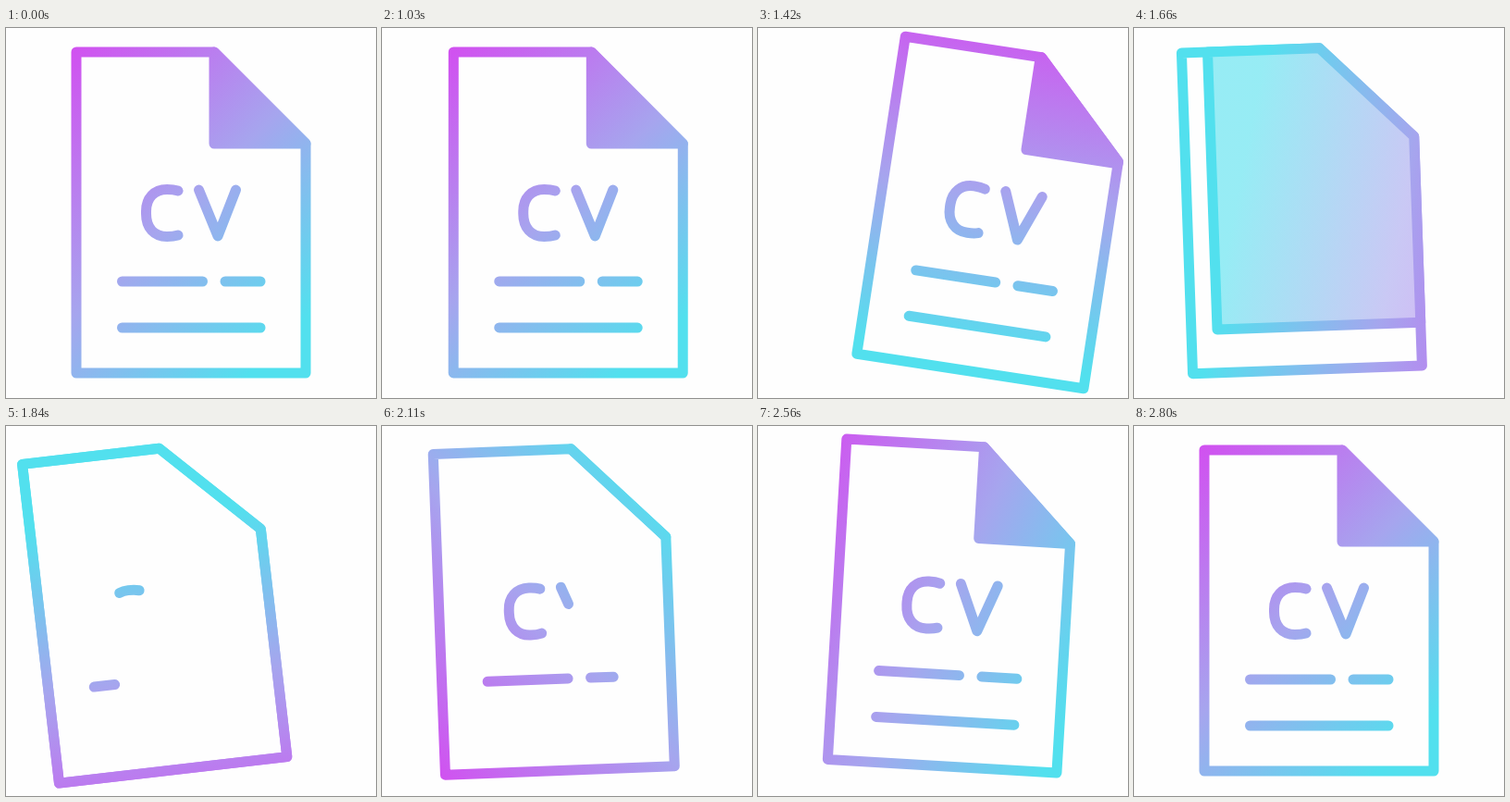
Write an HTML page that moves like this. It is 400 px wide and 400 px high and loops after 2830 ms.

```html
<!DOCTYPE html>
<html lang="en">
<head>
<meta charset="utf-8">
<title>CV</title>
<style>
  html, body { margin: 0; width: 100%; height: 100%; overflow: hidden; background: #fefefe; }
  svg { display: block; width: 100vw; height: 100vh; }
</style>
</head>
<body>
<svg viewBox="0 0 400 400">
  <defs>
    <linearGradient id="ink" gradientUnits="userSpaceOnUse">
      <stop offset="0" stop-color="#d052f0"/>
      <stop offset=".53" stop-color="#a6a5ee"/>
      <stop offset="1" stop-color="#52e0ee"/>
    </linearGradient>
  </defs>
  <g id="doc" fill="none" stroke="url(#ink)" stroke-width="11" stroke-linecap="round" stroke-linejoin="round">
    <path d="M76 26H225L324 125V373H76Z"/>
    <g id="content">
      <path data-from="1750" data-to="2050" pathLength="1" d="M186 176Q181 174.5 174 174.5C160 174.5 151.5 184 151.5 198V201C151.5 216 160 225.5 174 225.5Q181 225.5 186 224"/>
      <path data-from="2000" data-to="2400" pathLength="1" d="M208.5 175L229 225L248.5 175"/>
      <path data-from="1750" data-to="2020" pathLength="1" d="M125.5 274H212.5"/>
      <path data-from="2020" data-to="2170" pathLength="1" d="M237 274H275"/>
      <path data-from="2170" data-to="2440" pathLength="1" d="M125.5 324H275"/>
    </g>
    <path id="backing" stroke="none"/>
    <path id="fold" fill="url(#ink)"/>
  </g>
</svg>
<script>
const LOOP = 2830, START = 1030, STEP = 30;
const CLEARED = 1750, GROW = 2100;

const $ = id => document.getElementById(id);
const [doc, ink, fold, backing] = ['doc', 'ink', 'fold', 'backing'].map($);
const strokes = [...$('content').children];

const progress = (t, from, to) => Math.min(1, Math.max(0, (t - from) / (to - from)));
const ease = (t, from, to) => {
  const u = progress(t, from, to);
  return u * u * (3 - 2 * u);
};
const bump = (t, from, to) => Math.sin(Math.PI * progress(t, from, to)) ** 2;
const mix = (p, q, u) => p.map((v, i) => v + (q[i] - v) * u);

// Swing from rest to the right, left, right again and back to rest
const swing = (t, right, left, back) =>
  right * ease(t, 995, 1390)
  + (left - right) * ease(t, 1390, 1775)
  + (back - left) * ease(t, 1870, 2385)
  - back * ease(t, 2385, 2770);

// The colours make one full turn, fastest while the page turns
const inkAngle = t => 45
  + 45 * progress(t, 1000, 1420)
  + 180 * progress(t, 1420, 1840)
  + 90 * progress(t, 1840, 2320)
  + 45 * progress(t, 2320, 2800);

function setInk(t) {
  const angle = inkAngle(t) * Math.PI / 180;
  const offset = -22 - 100 * bump(t, 1350, 2050);
  [-190, 190].forEach((half, i) => {
    ink.setAttribute('x' + (i + 1), 200 + Math.cos(angle) * (offset + half));
    ink.setAttribute('y' + (i + 1), 199.5 + Math.sin(angle) * (offset + half));
  });
}

function foldPath(t) {
  const rest = [225, 125];
  const growing = t >= GROW;
  const grown = growing ? ease(t, GROW, 2400) : 1;
  const corner = growing
    ? mix([274.5, 75.5], rest, grown)
    : mix(rest, [76, 373], ease(t, 1400, 1760));
  const top = [Math.min(corner[0], 225), 26];
  const side = [324, Math.max(corner[1], 125)];
  return `M${top}L225 26L324 125L${side}L${mix(side, corner, grown)}Q${corner} ${mix(top, corner, grown)}Z`;
}

function render(t) {
  const x = swing(t, 57.3, -39.3, 16.5);
  const y = -3.6 * bump(t, 1440, 1830) - 7 * bump(t, 2050, 2800);
  const tilt = swing(t - 25, 8.7, -6.6, 5.1);
  doc.setAttribute('transform', `translate(${x} ${y}) rotate(${tilt} 200 199.5)`);
  setInk(t);

  const d = foldPath(t);
  fold.setAttribute('d', d);
  backing.setAttribute('d', d);
  backing.setAttribute('fill', t < CLEARED ? '#fefefe' : 'none');
  fold.setAttribute('fill-opacity', t < GROW ? 1 - progress(t, 1440, 1830) ** 1.6 : 1);

  for (const el of strokes) {
    const shown = t < CLEARED ? 1 : ease(t, +el.dataset.from, +el.dataset.to);
    el.setAttribute('visibility', shown > 0 ? 'visible' : 'hidden');
    el.setAttribute('stroke-dasharray', shown < 1 ? `${shown} 2` : 'none');
  }
}

const begin = performance.now();
function tick() {
  const t = (performance.now() - begin) % LOOP;
  render(t < START ? 0 : START + Math.floor((t - START) / STEP) * STEP);
  requestAnimationFrame(tick);
}
tick();
</script>
</body>
</html>
```
